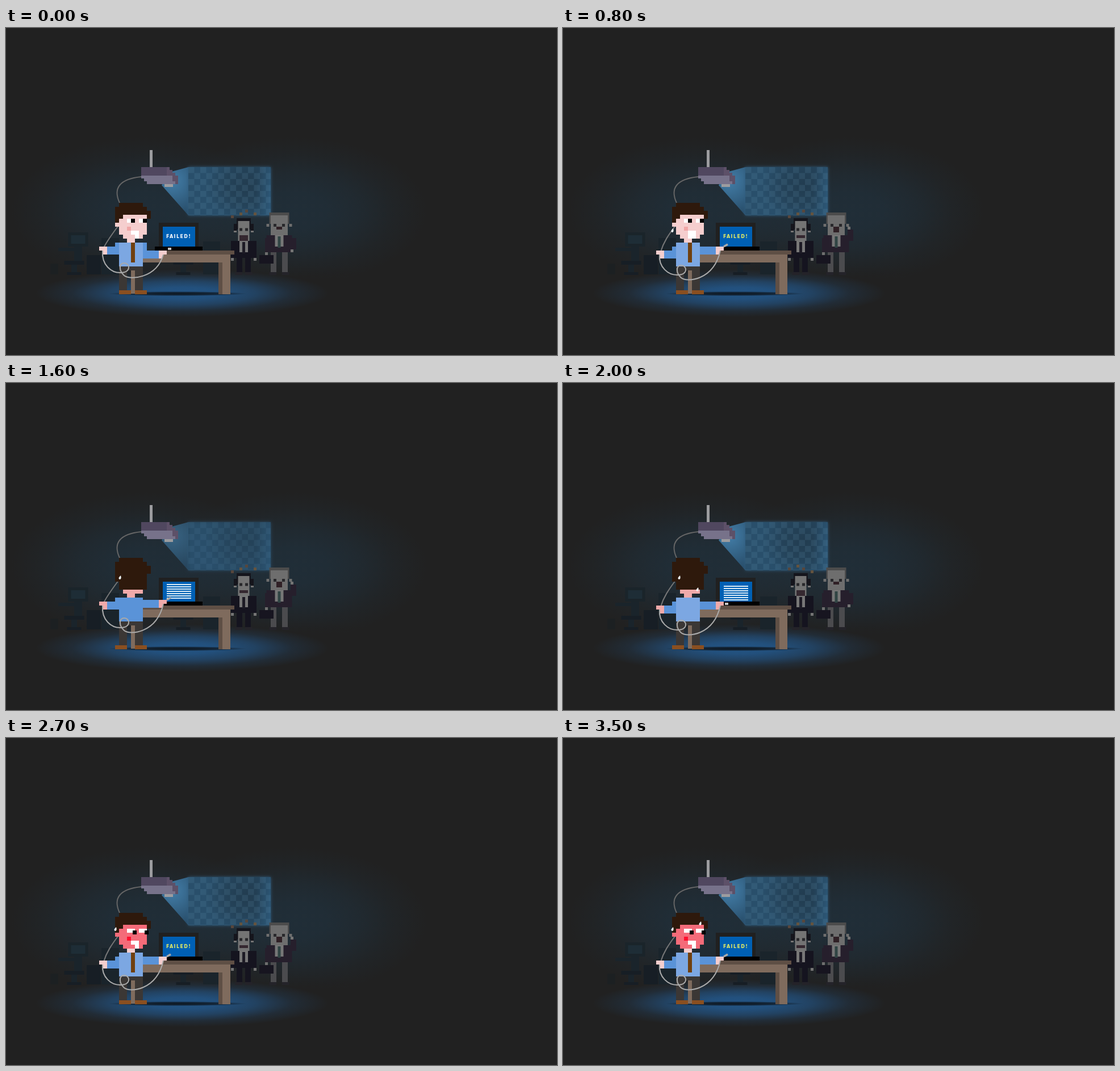
Animation of 970 by 576 pixels, one loop 3.7 s. Source, as an HTML page with a canvas:

```html
<!DOCTYPE html>
<html lang="en">
<head>
<meta charset="utf-8">
<title>Failed presentation</title>
<style>
html, body { margin: 0; width: 100%; height: 100%; overflow: hidden; background: #212121; }
canvas { display: block; }
</style>
</head>
<body>
<canvas id="stage" width="970" height="576"></canvas>
<script>
const ctx = document.getElementById('stage').getContext('2d');
const LOOP = 3700, BEAT = 200;
const PAUSES = [3, 9, 14]; // beats on which the plug stays where it was

function rect(color, x, y, w, h) {
  ctx.fillStyle = color;
  ctx.fillRect(x, y, w, h);
}

// Draws in cells of the given size, counted from (x, y).
function inGrid(x, y, size, paint) {
  ctx.save();
  ctx.translate(x, y);
  ctx.scale(size, size);
  paint();
  ctx.restore();
}

const bar = (color, half, y, h) => rect(color, -half, y, 2 * half, h);

function pair(color, x, y, w, h) {
  rect(color, x, y, w, h);
  rect(color, -x - w, y, w, h);
}

function glow(x, y, rx, ry, rgb, alphas) {
  ctx.save();
  ctx.translate(x, y);
  ctx.scale(rx, ry);
  const gradient = ctx.createRadialGradient(0, 0, 0, 0, 0, 1);
  alphas.forEach((a, i) => gradient.addColorStop(i / (alphas.length - 1), `rgba(${rgb},${a})`));
  rect(gradient, -1, -1, 2, 2);
  ctx.restore();
}

function line(path, color, width = 2) {
  ctx.strokeStyle = color;
  ctx.lineWidth = width;
  ctx.stroke(new Path2D(path));
}

function drawRoom() {
  rect('#212121', 0, 0, 970, 576);
  for (const x of [245, 505]) glow(x, 322, 236, 130, '32,50,63', [.75, .7, .5, .2, 0]);
  const fade = ctx.createLinearGradient(0, 420, 0, 445);
  fade.addColorStop(0, 'rgba(33,33,33,0)');
  fade.addColorStop(1, '#212121');
  rect(fade, 0, 420, 970, 40);
  glow(310, 467, 258, 42, '35,88,140', [.95, .85, .6, .2, 0]);
  glow(302, 468, 122, 4, '14,24,34', [1, .9, .7, 0]);
}

function drawFurniture() {
  inGrid(127, 360, 5, () => {
    bar('#1a242a', 3.5, 0, 5);
    bar('#1e2d36', 2.5, 1, 3);
  });
  for (const x of [120, 312]) {
    inGrid(x, 410, 5, () => {
      bar('#171e25', 3.5, 0, 1.4);
      bar('#1a242b', 1, 1.4, 2.6);
      bar('#171e25', 2.5, 4, 1);
    });
  }
  rect('#1a242b', 120, 385, 14, 25);
  rect('#1a242b', 92, 387, 28, 6);
  rect('#1c2022', 78, 415, 14, 19);
  rect('#171e25', 142, 400, 25, 34);
  rect('#1a242b', 168, 370, 31, 64);
  rect('#1a242b', 347, 376, 30, 58);
}

function drawProjection(dim) {
  ctx.save();
  ctx.globalAlpha = dim ? .7 : 1;
  const beam = ctx.createRadialGradient(292, 269, 2, 292, 269, 60);
  beam.addColorStop(0, '#427ca6');
  beam.addColorStop(1, '#294f6c');
  ctx.fillStyle = beam;
  ctx.fill(new Path2D('M288 254 L321 245 V330 L274 277 Z'));

  ctx.shadowColor = '#2f5c7e';
  ctx.shadowBlur = 5;
  rect('#294f6b', 321, 245, 145, 85);
  ctx.shadowBlur = 0;
  ctx.beginPath();
  ctx.rect(321, 245, 145, 85);
  ctx.clip();
  glow(425, 277, 75, 70, '33,58,77', [.9, .6, 0]);
  glow(470, 290, 30, 90, '55,112,154', [.5, .25, 0]);
  inGrid(321, 245, 10.5, () => {
    for (let row = 0; row < 9; row++) {
      for (let col = row % 2; col < 14; col += 2) rect('rgba(105,155,185,.14)', col, row, 1, 1);
    }
  });
  ctx.restore();
}

function drawProjector() {
  rect('#9c9c9f', 253, 215, 5, 30);
  rect('#9c9c9f', 279, 275, 15, 5);
  inGrid(238, 245, 5, () => {
    for (let row = 0; row < 6; row++) {
      rect('#5d5068', 9, row, 1 + Math.min(row, 3), 1);
      if (row < 3) rect('#50475f', 0, row, 9, 1);
      else rect('#77728a', row - 3, row, row > 3 ? 10 : 11, 1);
    }
  });
}

// The parts both onlookers share, around a vertical axis.
function drawGuest({ hair, face, suit, trousers, head, chest, tie, eye, leg, height }) {
  bar(hair, head, 0, 4);
  bar(face, head - .5, 1, 7);
  pair(face, head, 4, 1, 1);
  pair('#28282b', eye, 4 - eye % 1, 1, 1);
  bar(suit, chest, 8, 6);
  bar('#777', 1.5, 8, 4);
  bar(tie, .5, 8.4, 4);
  pair(trousers, leg, 14, 2, height - 14);
  pair('#242329', leg, height - 1, 2.5, 1);
}

function drawWorriedMan(plugged, swapped) {
  for (let i = 0; i < 4; i++) {
    const height = Math.abs(i - (swapped ? 1 : 2));
    rect(i % 2 ? '#64533f' : '#57463c', 396 + 5 * Math.round(i * 2.67), 320 + height * 5, 5, 5);
  }
  inGrid(418.5, 335, 5, () => {
    drawGuest({ hair: '#15151c', face: '#747474', suit: '#15141f', trousers: '#15141f',
      head: 2.5, chest: 4.5, tie: '#1d1b25', eye: .5, leg: .5, height: 20 });
    pair('#15151c', 2.5, 2, 1, 2.4);
    bar('#352830', 1.5, 6, plugged ? 2 : 1);
    pair('#747474', 3.5, 14, 1, 1);
  });
}

function drawBoss(plugged) {
  inGrid(481, 325, 5, () => {
    drawGuest({ hair: '#4c4c4c', face: '#6e6e6e', suit: '#261f2c', trousers: '#4b4b4e',
      head: 3.5, chest: 4.5, tie: '#304544', eye: 1, leg: 1, height: 22 });
    bar('#302126', 1, 5, plugged ? 1 : 2);
    rect('#261f2c', -5, 9, 2, 5);
    rect('#261f2c', 4, plugged ? 9 : 6, 2, 4);
    rect('#747474', 4, plugged ? 13 : 5, 1, 1);
    rect('#6e6e6e', -5, 14, 1, 1);
    rect('#171520', -7, 15, 5, 3);
  });
}

function drawDesk(back, plugged) {
  rect('#5f4f45', 241, 392, 161, 7);
  rect('#7f6b5d', 241, 399, 154, 14);
  rect('#7f6b5d', 374, 413, 21, 56);
  rect('#5f4f45', 374, 413, 7, 56);
  rect('#7f6b5d', 220, 427, 7, 41);
  rect('#202020', 269, 343, 70, 42);
  rect('#0060b4', 276, 350, 57, 35);
  rect('#000', 262, 385, 84, 7);
  if (back) {
    for (let i = 0; i < 7; i++) rect('#d9e9f5', 283, (plugged ? 357 : 354) + i * 4, 43, 2);
  } else {
    ctx.fillStyle = plugged ? '#fff' : '#e9ee62';
    ctx.font = 'bold 8px "DejaVu Sans", sans-serif';
    ctx.letterSpacing = '1.4px';
    ctx.fillText('FAILED!', 282, 370);
  }
}

function drawHead(look, plugged) {
  const back = look === 'back', red = look === 'red';
  const hair = '#2e190c';
  rect(hair, 1, 0, 6, 1);
  rect(hair, 0, 1, 8, back ? 5 : 4);
  rect(hair, 8, 2, 1, 2);
  rect(back ? '#f0aaaa' : '#f5cece', 3, 9, 2, 1);
  if (back) {
    rect(hair, 1, 6, 7, 2);
    rect('#f0aaaa', 2, 8, 5, 1);
    return;
  }
  const face = red ? '#f46b79' : '#f5cece';
  rect(face, 2, 3, 6, 1);
  rect(face, 1, 4, 7, 4);
  rect(face, 0, 5, 1, 1);
  rect(face, 2, 8, 5, 1);
  rect(red ? '#ff102f' : '#f0a7a7', 3, 6, 1, 1);
  const glance = red ? .43 : 0;
  for (const x of [3, 6]) {
    rect('#fff', x, 4, red ? 2 : 1, 1);
    rect('#000', x + 1 + glance, 4 + glance, 1, 1);
  }
  const grin = plugged || red ? 1 : 2;
  rect('#fff', 4, 7, 2, 1);
  rect('#fff', 6 - grin, 8, grin, 1);
}

function drawBody(back, plugged, left, right) {
  const sleeve = '#5a93d8', skin = back ? '#f0aaaa' : '#f5cece';
  rect('#3b3735', 1, 16, 6, 1);
  for (const x of [1, 5]) {
    rect('#3b3735', x, 17, 2, 5);
    rect('#8a4f20', back && x === 1 ? 0 : x, 22, 3, 1);
  }
  rect(back && !plugged ? sleeve : '#7ca7e2', 1, 10, 6, 6);
  rect(sleeve, 0, left - 1, 1, 1);
  rect(sleeve, -2, left, 3, 2);
  rect(skin, -4, left, 2, 1);
  rect(skin, -3, left + 1, 1, 1);
  if (right > 11) rect(sleeve, 7, 10, 1, 2);
  rect(sleeve, 7, right, 4, 2);
  rect(skin, 11, right, 2, 1);
  rect(skin, 11, right + 1, 1, 1);
  if (!back) rect('#70400f', 4, 10, 1, 5);
}

function drawCable(slack, start, end) {
  const low = 443 + slack;
  line(`M170 ${start} C168 ${low - 26} 185 ${low - 11} 203 ${low - 12}
    S218 ${low - 29} 208 ${low - 29} S199 ${low - 15} 208 ${low - 7}
    S265 ${low - 1} 277 ${end}`, '#aaa');
}

function drawDrop(x, y) {
  ctx.fillStyle = '#f1f7fa';
  ctx.fill(new Path2D(`M${x + 2} ${y - 4} q2 7 -2 7 q-4 -2 2 -7Z`));
}

function drawSweat(beat, look) {
  if (look === 'back') {
    drawDrop(196 + 2 * Math.max(0, beat - 6), 343);
    if (beat > 8) drawDrop(236, 344 + (beat - 9) * 20);
  } else if (beat > 2 && beat !== 5) {
    drawDrop(192, beat === 4 ? 357 : 337);
    if (beat > 14) drawDrop(241, 327);
    if (beat === 16) drawDrop(201, 325);
  }
}

function draw(time) {
  // One beat near the end is half as long.
  const beat = Math.floor((time < 2600 ? time : time + 100) / BEAT);
  const pauses = PAUSES.filter(p => p <= beat).length;
  const plugged = (beat - pauses) % 2 === 0;
  const back = beat >= 6 && beat < 12;
  const look = back ? 'back' : beat >= 14 ? 'red' : 'front';
  const leftUp = back ? !plugged && beat > 6 : plugged;
  const left = leftUp ? 11 : 12;
  const right = back ? (plugged ? 11 : 10.57) : (plugged ? 12 : 11);
  const handY = row => 308 + row * 7;

  drawRoom();
  drawFurniture();
  drawProjection(back && !plugged);
  drawProjector();
  drawWorriedMan(plugged, beat === 3 || beat === 10);
  drawBoss(plugged);
  drawDesk(back, plugged);
  line('M238 262 C200 266 188 282 200 308', '#666');
  line(`M198 348 C186 364 177 377 172 ${handY(left) + 2}`, '#777');
  inGrid(192, 308, 7, () => {
    drawBody(back, plugged, left, right);
    drawHead(look, plugged);
  });
  drawCable(back === plugged ? 4 : 0, handY(left) + 7, handY(right) + 7);
  if (plugged) rect('#c8c8c8', 285, 387, 6, 4);
  else line(`M283 ${handY(right)} l7 -4`, '#aaa', 3.5);
  drawSweat(beat, look);
}

function tick(now) {
  draw(now % LOOP);
  requestAnimationFrame(tick);
}
draw(0);
requestAnimationFrame(tick);
</script>
</body>
</html>
```
